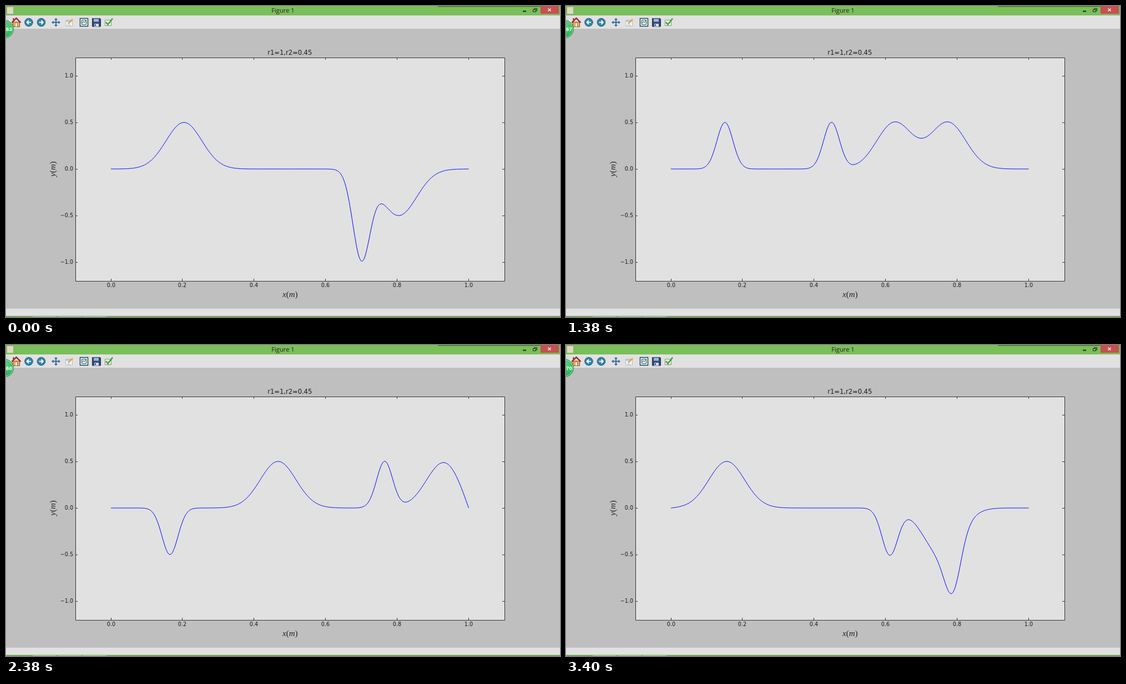
These frames come from a looping animation (998x561 px, 3420 ms). An HTML page:

```html
<!DOCTYPE html>
<html lang="en">
<head>
<meta charset="utf-8">
<title>Figure 1</title>
<style>
  html, body { margin: 0; width: 100%; height: 100%; overflow: hidden; background: #bfbfbf; }
  svg { display: block; width: 998px; height: 561px; }
  .ui { font-family: "Open Sans", sans-serif; }
  .plot { font: 9.6px "DejaVu Sans", sans-serif; fill: #1c1c1c; }
  .math { font: italic 15px "Liberation Serif", serif; fill: #222; }
  .up { font-style: normal; }
  .axes { fill: none; stroke: #333; stroke-width: 1; }
  #wave { fill: none; stroke: #00f; stroke-width: 1; stroke-linejoin: round; }
</style>
</head>
<body>
<svg viewBox="0 0 998 561">
  <defs>
    <radialGradient id="ball" cx=".55" cy=".3" r=".75">
      <stop offset="0" stop-color="#58d67c"/>
      <stop offset="1" stop-color="#27a552"/>
    </radialGradient>
  </defs>

  <!-- window frame -->
  <rect width="998" height="17" fill="#7abf5a"/>
  <rect x="778" width="186" height="1.5" fill="#46733a"/>
  <rect x="963" width="33" height="14" fill="#c75050"/>
  <path d="M976.5 4.5l5 5m0-5l-5 5" stroke="#fff" stroke-width="1.3"/>
  <rect x="931" y="8.5" width="6" height="2" fill="#222"/>
  <path d="M951.5 6V4.5h5v4H955M949.500 6.500h5v4h-5z" fill="none" stroke="#222"/>
  <rect x="2" y="2" width="11" height="12" fill="#e6d5c4"/>
  <text class="ui" x="499" y="12.300" font-size="11.200" text-anchor="middle" fill="#222">Figure 1</text>

  <!-- toolbar -->
  <rect y="17" width="998" height="24" fill="#e1e1e1"/>
  <path d="M3.500 20v19" stroke="#aaa" stroke-dasharray="1 2"/>
  <g>
    <path d="M12.500 29h12v8.500h-12z" fill="#e8ad62" stroke="#8a4a2a"/>
    <path d="M16.500 30.500h4v7h-4z" fill="#fff0d8" stroke="#9a6030" stroke-width=".7"/>
    <path d="M10.500 30L18.500 22l8 8" fill="none" stroke="#a32020" stroke-width="2.400"/>
    <path d="M13.500 22v4" stroke="#a32020" stroke-width="2"/>
  </g>
  <g id="back">
    <circle cx="41" cy="29.500" r="7.300" fill="#3182a8" stroke="#1f5e80"/>
    <path d="M45 29.500h-7m3-3.500l-3.500 3.500 3.500 3.500" fill="none" stroke="#fff" stroke-width="1.800"/>
  </g>
  <use href="#back" transform="translate(104.500) scale(-1 1)"/>
  <g fill="#3a6698">
    <path d="M89 24h2v11h-2zM84.500 28.500h11v2h-11z"/>
    <path d="M90 21.500l3 3.500h-6zM90 37.500l3-3.500h-6zM82 29.500l3.500-3v6zM98 29.500l-3.500-3v6z"/>
  </g>
  <path d="M107.500 25.500h12v11h-12z" fill="#f3f3ef" stroke="#b7bdc0"/>
  <path d="M107.500 25.500h9v3h-9z" fill="#a8cbe0"/>
  <path d="M112 32l8-8" stroke="#dda95a" stroke-width="3"/>
  <path d="M109.500 34.500h7" stroke="#9bb8c8"/>
  <g>
    <path d="M133.500 22.500h14v14h-14z" fill="#fff" stroke="#203c60" stroke-width="1.500"/>
    <path d="M136.500 25.500h8v8h-8z" fill="#e9eef4" stroke="#31547c"/>
    <path d="M137 31l2-3 2 2 3-4" fill="none" stroke="#31547c"/>
    <path d="M140.500 21l2 3h-4zM140.500 38l2-3h-4zM132 29.500l3-2v4zM149 29.500l-3-2v4z" fill="#55b548"/>
  </g>
  <path d="M155.500 22.500h14l1 1v13.500h-15z" fill="#2f4a78" stroke="#1d2e50"/>
  <path d="M158 23h9v5.500h-9z" fill="#9fb4cf"/>
  <path d="M159 32h8v5h-8z" fill="#d9dde2"/>
  <path d="M160 33h2v3h-2z" fill="#2f4a78"/>
  <path d="M178.500 25.500h11v10h-11z" fill="#f2f2f2" stroke="#8b8b8b"/>
  <path d="M180 29l3.500 4.500 8.500-11" fill="none" stroke="#25b425" stroke-width="2.600"/>

  <!-- figure -->
  <rect y="41" width="998" height="505" fill="#bfbfbf"/>
  <rect x="125" y="93" width="773" height="403" fill="#e1e1e1"/>
  <path id="wave"/>
  <path id="axes" class="axes"/>
  <g id="labels" class="plot"></g>
  <text class="plot" x="511.300" y="88" style="font-size:11.500px" text-anchor="middle">r1=1,r2=0.45</text>
  <text class="math" x="511.800" y="525" text-anchor="middle">x<tspan class="up">(</tspan>m<tspan class="up">)</tspan></text>
  <text class="math" transform="translate(89 294) rotate(-90)" text-anchor="middle">y<tspan class="up">(</tspan>m<tspan class="up">)</tspan></text>

  <!-- status bar -->
  <rect y="546" width="998" height="13" fill="#e1e1e1"/>
  <rect y="559" width="998" height="2" fill="#6cb04e"/>
  <path d="M48 560.500h43M94 560.500h42M138 560.500h43" stroke="#b9d9aa"/>

  <!-- floating counter -->
  <circle cx="-2.500" cy="41.500" r="16" fill="url(#ball)" stroke="#1f8a43"/>
  <circle cx="-2.500" cy="41.500" r="14.800" fill="none" stroke="#b5ecc4" stroke-width=".8"/>
  <text id="count" x="0" y="44.700" font-family="Liberation Sans, sans-serif" font-size="9.800" font-weight="700" fill="#fff">63</text>
</svg>
<script>
  const LOOP = 3420, STEP = 20;
  const $ = id => document.getElementById(id);
  const px = x => 189 + 644.5 * x;
  const py = y => 294 - 168 * y;

  function drawAxes() {
    let d = 'M125.5 93.5H898.5V496.500H125.5Z', text = '';
    for (let i = 0; i < 6; i++) {
      const x = Math.floor(px(i / 5)) + .5;
      d += `M${x} 496v-4M${x} 93v4`;
      text += `<text x="${x}" y="506.800" text-anchor="middle">${(i / 5).toFixed(1)}</text>`;
    }
    for (let i = -2; i <= 2; i++) {
      const y = py(i / 2);
      d += `M125 ${y + .5}h4M898 ${y + .5}h-4`;
      const label = (i < 0 ? '\u2212' : '') + Math.abs(i / 2).toFixed(1);
      text += `<text x="121" y="${y + 3.200}" text-anchor="end">${label}</text>`;
    }
    $('axes').setAttribute('d', d);
    $('labels').innerHTML = text;
  }

  // Gaussian bump at a, extended as an odd function of period 2 (fixed ends)
  function pulse(a, spread) {
    const g = s => Math.exp(-s * s / spread);
    const f = s => {
      s -= 2 * Math.floor((s + 1) / 2);
      return g(s - a) - g(s + a) - g(s - 2 + a) + g(s + 2 - a);
    };
    return (x, shift) => (f(x - shift) + f(x + shift)) / 2;
  }
  const narrow = pulse(.3, .001);
  const wide = pulse(.7, .005);

  // [ms, distance travelled by the narrow pulse]; the wide one is half as fast
  const pace = [[0, -.9916], [340, -.785], [980, -.3947], [1380, -.149],
                [2020, .2413], [2740, .689], [3400, 1.088]];
  const counts = [[0, 63], [720, 65], [1280, 67], [1840, 68], [2420, 69], [3000, 70]];

  function travel(t) {
    let i = 1;
    while (i < pace.length - 1 && t > pace[i][0]) i++;
    const [t0, a] = pace[i - 1], [t1, b] = pace[i];
    return a + (b - a) * (t - t0) / (t1 - t0);
  }

  function draw(t) {
    const s = travel(t), pts = [];
    for (let i = 0; i <= 500; i++) {
      const x = i / 500;
      const y = narrow(x, s) + wide(x, s / 2);
      pts.push(px(x).toFixed(2) + ' ' + py(y).toFixed(2));
    }
    $('wave').setAttribute('d', 'M' + pts.join('L'));
    $('count').textContent = counts.filter(c => c[0] <= t).pop()[1];
  }

  const start = performance.now();
  let last = -1;
  function tick() {
    const t = Math.floor((performance.now() - start) % LOOP / STEP) * STEP;
    if (t !== last) draw(last = t);
    requestAnimationFrame(tick);
  }
  drawAxes();
  tick();
</script>
</body>
</html>
```
